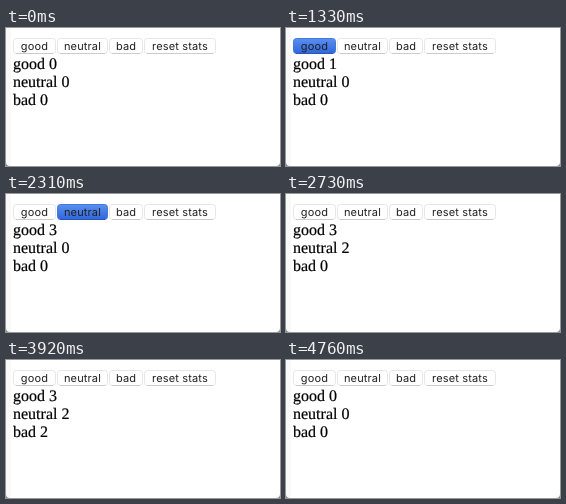
Recreate the animation shown at these times as an HTML page. Size 274 px wide and 138 px high, loop 5250 ms.

```html
<!DOCTYPE html>
<html lang="en">
<head>
<meta charset="utf-8">
<title>Feedback counter</title>
<style>
  html, body { margin: 0; width: 100%; height: 100%; overflow: hidden; background: #fff; }
  svg { display: block; width: 274px; height: 138px; text-rendering: geometricPrecision; }
  .label { font: 11px Inter, sans-serif; letter-spacing: 0.15px; fill: #222; text-anchor: middle; }
  .stat { font: 16px "Liberation Serif", serif; fill: #000; stroke: #000; stroke-width: 0.2px; }
  .face { fill: #fff; stroke: #e6e6e6; }
  .shade { stroke: #cbcbcb; }
  .pressed .face { fill: url(#blue); stroke: #4678dc; }
  .pressed .shade { stroke: #2b54b4; }
</style>
</head>
<body>
<svg id="stage" viewBox="0 0 274 138">
  <defs>
    <linearGradient id="blue" x1="0" y1="0" x2="0" y2="1">
      <stop offset="0" stop-color="#5a90ee"/>
      <stop offset="1" stop-color="#2f66dc"/>
    </linearGradient>
  </defs>
  <rect width="5" height="138" fill="#f9f9f9"/>
  <path d="M0 134Q0 138 4 138H0ZM274 134Q274 138 270 138H274Z" fill="#8a8a8a"/>
</svg>
<script>
const LOOP = 5250;
const FRAME = 70;
const LEFT = 7;
const LINE = 18;
const stage = document.getElementById("stage");

// lag: frames between pressing the button and the counts updating
const BUTTONS = [
  { name: "good", width: 43, lag: 0 },
  { name: "neutral", width: 51, lag: 1 },
  { name: "bad", width: 34, lag: 1 },
  { name: "reset stats", width: 72, lag: 2 },
];
const [GOOD, NEUTRAL, BAD, RESET] = BUTTONS;
const STATS = [GOOD, NEUTRAL, BAD];

const click = (button, press, frames = 1) => ({
  button,
  press,
  release: press + frames * FRAME,
  update: press + button.lag * FRAME,
});

const CLICKS = [
  click(GOOD, 1330), click(GOOD, 1750), click(GOOD, 1820),
  click(NEUTRAL, 2310), click(NEUTRAL, 2590, 2),
  click(BAD, 3570), click(BAD, 3850),
  click(RESET, 4620, 2),
];

function add(parent, tag, attrs, text = "") {
  const node = document.createElementNS("http://www.w3.org/2000/svg", tag);
  for (const [name, value] of Object.entries(attrs)) node.setAttribute(name, value);
  node.textContent = text;
  return parent.appendChild(node);
}

let x = LEFT;
for (const button of BUTTONS) {
  const { name, width } = button;
  button.node = add(stage, "g", {});
  add(button.node, "rect", { class: "face", x: x + 0.5, y: 10.5, width: width - 1, height: 15, rx: 3 });
  add(button.node, "path", { class: "shade", d: `M${x + 3} 25.5h${width - 6}` });
  add(button.node, "text", { class: "label", x: x + width / 2, y: 22 }, name);
  x += width + 1;
}

STATS.forEach((stat, i) => {
  stat.line = add(stage, "text", { class: "stat", x: LEFT, y: 41 + LINE * i });
});

function draw(time) {
  const isHeld = button => CLICKS.some(c => c.button === button && c.press <= time && time < c.release);
  const counted = CLICKS.filter(c => c.update <= time);
  const wasReset = counted.some(c => c.button === RESET);

  for (const button of BUTTONS) button.node.classList.toggle("pressed", isHeld(button));
  for (const stat of STATS) {
    const count = wasReset ? 0 : counted.filter(c => c.button === stat).length;
    stat.line.textContent = `${stat.name} ${count}`;
  }
}

function tick() {
  draw(performance.now() % LOOP);
  requestAnimationFrame(tick);
}
tick();
</script>
</body>
</html>
```
